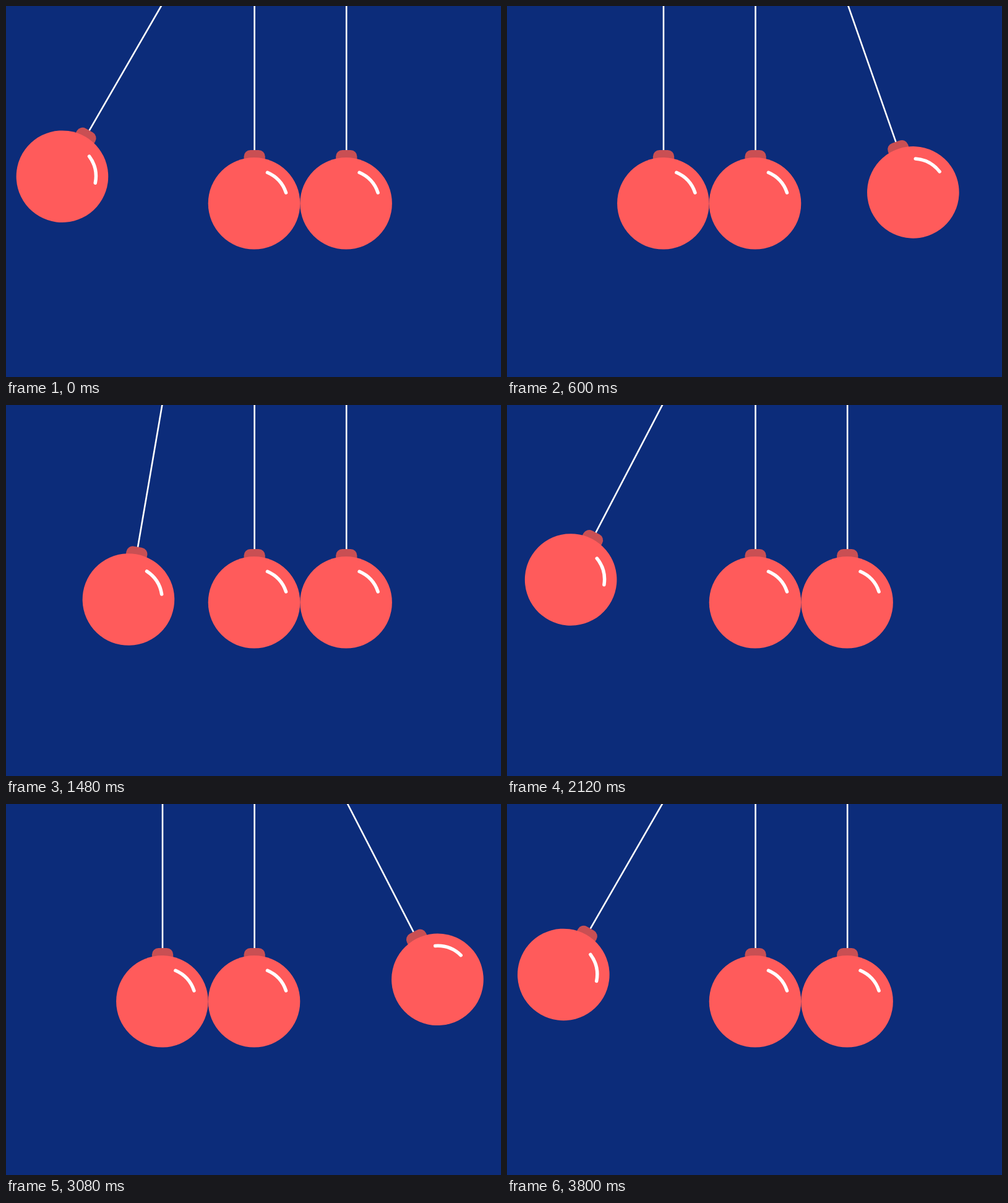
These frames come from a looping animation (800x600 px, 3.84 s). An HTML page:

```html
<!DOCTYPE html>
<html lang="en">
<head>
<meta charset="utf-8">
<title>Swinging baubles</title>
<style>
  html, body { margin: 0; width: 100%; height: 100%; overflow: hidden; background: #0c2c7a; }
  svg { display: block; }
</style>
</head>
<body>
<svg width="800" height="600" viewBox="0 0 800 600">
  <defs>
    <!-- Origin is the pivot of the string -->
    <g id="bauble">
      <path d="M0 -4V242" stroke="#fff" stroke-width="2.6"/>
      <rect x="-17.1" y="236.8" width="34.3" height="26" rx="10.5" fill="#c94f53"/>
      <circle cx="-.6" cy="323.1" r="74.3" fill="#ff5b5b"/>
      <path d="M20.9 273.1A54.4 54.4 0 0 1 50.9 305.6" fill="none" stroke="#fff" stroke-width="5.5" stroke-linecap="round"/>
    </g>
  </defs>
  <use id="left" href="#bauble"/>
  <use href="#bauble" transform="translate(401.6 -3.8)"/>
  <use id="right" href="#bauble"/>
</svg>
<script>
const LOOP = 3840, QUARTER = 480, MAX_ANGLE = 30;
const left = document.getElementById('left');
const right = document.getElementById('right');

// Ease-in sharpness of each quarter swing: fall, rise, fall, rise, ...
const handles = [.115, .115, .135, .105, .113, .165, .153, .13];

const bezier = (s, a, b) => 3 * (1 - s) * s * ((1 - s) * a + s * b) + s ** 3;

// Cubic Bezier easing with control points (1/3, 0) and (5/6, handle)
function ease(u, handle) {
  let lo = 0, hi = 1;
  for (let i = 0; i < 24; i++) {
    const mid = (lo + hi) / 2;
    if (bezier(mid, 1 / 3, 5 / 6) < u) lo = mid; else hi = mid;
  }
  return bezier(lo, 0, handle);
}

function pose(bauble, x, angle) {
  bauble.setAttribute('transform', `translate(${x} -3.8) rotate(${angle})`);
}

function render(time) {
  const phase = (time % LOOP) / QUARTER;
  const quarter = Math.floor(phase);
  const u = phase - quarter;
  const fromPeak = quarter % 2 ? 1 - u : u;
  const angle = MAX_ANGLE * (1 - ease(fromPeak, handles[quarter]));
  const leftSwings = quarter % 4 === 0 || quarter % 4 === 3;
  pose(left, 253, leftSwings ? angle : 0);
  pose(right, 550.2, leftSwings ? 0 : -angle);
}

function frame() {
  render(performance.now());
  requestAnimationFrame(frame);
}
frame();
</script>
</body>
</html>
```
